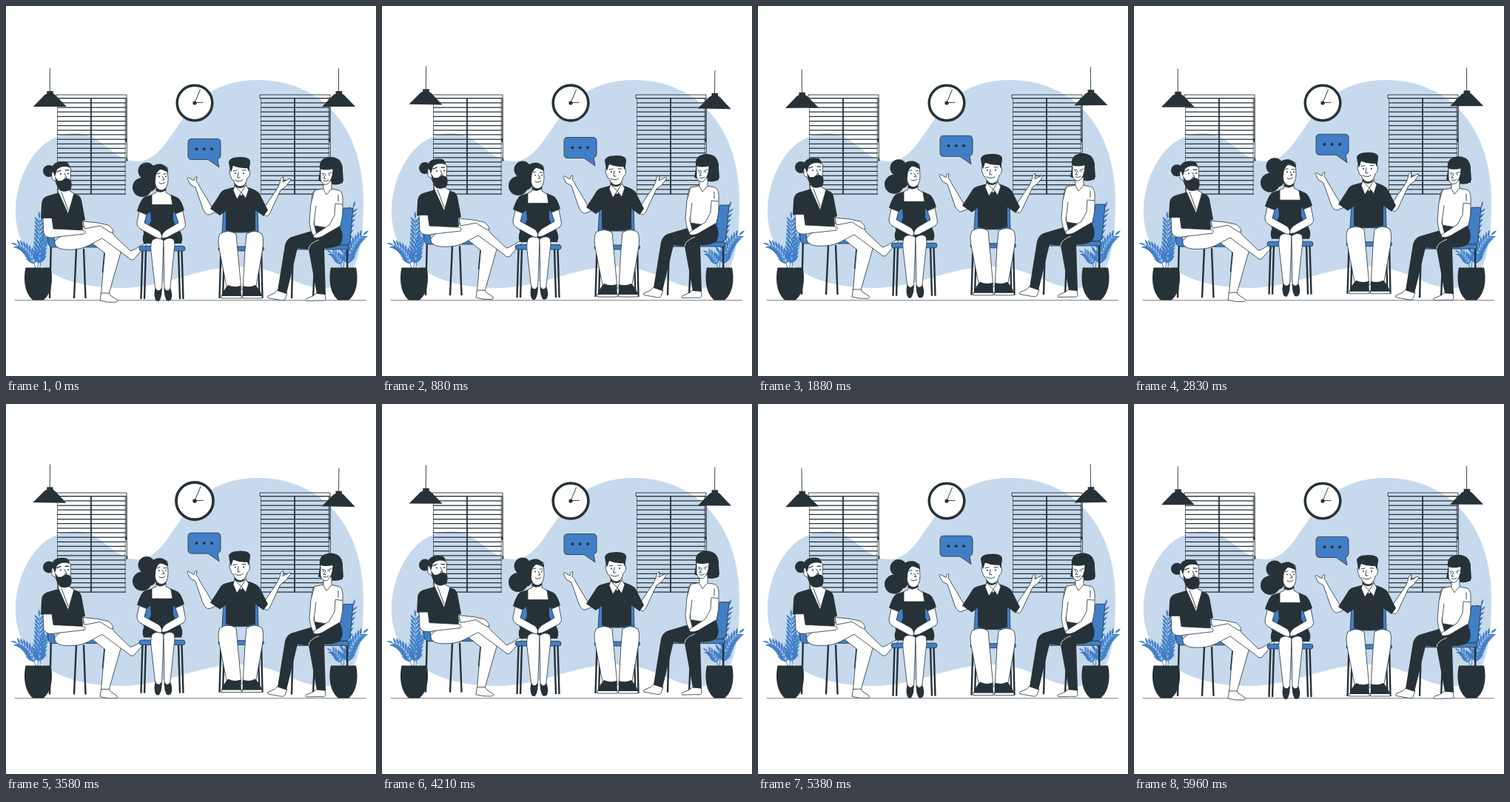
Recreate the animation shown at these times as an HTML page. Size 500 by 500 pixels, loop 6 s.

```html
<!DOCTYPE html>
<html lang="en">
<head>
<meta charset="utf-8">
<title>Group talk</title>
<style>
html, body { margin: 0; width: 100%; height: 100%; overflow: hidden; background: #fff; }
svg { display: block; width: 100%; height: 100%; }
.d { fill: #263238; }
.b { fill: #407fc8; }
.w { fill: #fff; stroke: #263238; stroke-width: .8; stroke-linejoin: round; }
.l { fill: none; stroke: #263238; stroke-width: .9; stroke-linecap: round; stroke-linejoin: round; }
.leg { fill: none; stroke: #263238; stroke-width: 2.4; }
.o { stroke: #263238; stroke-width: .8; stroke-linejoin: round; }
.thin { stroke-width: .6; }
.slat { stroke-width: 1.25; }
.thick { stroke-width: 1.8; }
</style>
</head>
<body>
<svg id="stage" viewBox="0 0 500 500" xmlns="http://www.w3.org/2000/svg"></svg>
<script>
const stage = document.getElementById('stage');
const path = (cls, d) => `<path class="${cls}" d="${d}"/>`;
const dot = (cls, x, y, r) => `<circle class="${cls}" cx="${x}" cy="${y}" r="${r}"/>`;
const group = (id, ...parts) => `<g id="${id}">${parts.join('')}</g>`;

function blinds(x) {
  let slats = '';
  for (let i = 0; i <= 21; i++) {
    slats += `M${x + 1} ${(124.7 + i * 6.16).toFixed(2)}h92`;
  }
  return path('l', `M${x} 120h94.500v4.700h-94.500Z`) +
    path('l slat', slats) +
    path('l thin', `M${x + 1} 125V254M${x + 92.6} 125V254`) +
    path('l thick', `M${x + 46.5} 125V254M${x + 93.6} 180v3M${x + 94.8} 206v3`) +
    path('l', `M${x + 93.6} 125V181M${x + 94.8} 125V207`);
}

// A frond: leaf pairs along a quadratic curve, shrinking toward the tip.
function frond(x0, y0, cx, cy, x1, y1, pairs, size) {
  let leaves = '';
  for (let i = 1; i <= pairs; i++) {
    const t = i / pairs, u = 1 - t;
    const x = u * u * x0 + 2 * u * t * cx + t * t * x1;
    const y = u * u * y0 + 2 * u * t * cy + t * t * y1;
    const dir = Math.atan2(u * (cy - y0) + t * (y1 - cy), u * (cx - x0) + t * (x1 - cx)) * 180 / Math.PI;
    const s = size * (1 - .35 * t);
    for (const turn of i === pairs ? [0] : [-36, 36]) {
      leaves += `<path class="b" transform="translate(${x.toFixed(1)} ${y.toFixed(1)}) rotate(${(dir + turn).toFixed(1)})"
        d="M0 0Q${s * .5} ${-s * .25} ${s} 0Q${s * .5} ${s * .25} 0 0Z"/>`;
    }
  }
  return `<path d="M${x0} ${y0}Q${cx} ${cy} ${x1} ${y1}" fill="none" stroke="#407fc8" stroke-width="1"/>` + leaves;
}

const pot = x => path('d', `M${x - 17} 353.500H${x + 17}C${x + 21} 372 ${x + 17} 390 ${x + 7} 397.500H${x - 7}C${x - 17} 390 ${x - 21} 372 ${x - 17} 353.500Z`);

const lamp = x =>
  path('l', `M${x} 84.500V116`) +
  path('d', `M${x - 4} 115H${x + 4.500}V118.500L${x + 7} 120L${x + 22.500} 136H${x - 22.500}L${x - 7} 120L${x - 4} 118.500Z`);

const backdrop =
  `<path fill="#c7d9ec" d="M13 272C15 235 37 172 95 172C130 172 145 210 177 210C232 210 228 100 340 100C427 100 483 166 483 262C483 340 470 381 430 381C390 381 370 352 315 352C260 352 215 381 155 381C70 381 10 345 13 272Z"/>` +
  blinds(68.5) + blinds(343.5) +
  path('l thin', 'M12 397.600H486');

const clock = group('clock',
  '<circle cx="255" cy="131" r="23.8" fill="#fff" stroke="#263238" stroke-width="3.5"/>',
  path('l', 'M255 131L262.500 113M255 130.700L266 130.300'),
  dot('d', 255, 131, 2.6));

const plants =
  frond(43, 354, 46, 318, 45, 288, 11, 16) +
  frond(40, 354, 33, 328, 16, 323, 9, 15) +
  frond(46, 354, 47, 325, 54, 312, 8, 14) +
  frond(456, 354, 459, 308, 469, 273, 10, 15) +
  frond(460, 354, 464, 325, 482, 310, 10, 16) +
  frond(454, 354, 450, 339, 441, 334, 6, 13) +
  pot(43.5) + pot(456);

const beardedMan = group('beardedMan',
  path('leg', 'M61 318L59 395M95 328L92 395M105 328L107.500 395M134 327L131 360'),
  path('b o', 'M56 310H64L66 318H133Q136 318 136 322V326H62Q58 326 57 320Z'),
  // supporting leg and foot
  path('w', 'M112 317C134 307 157 309 155 333L139 389H128.500L133.500 334Z'),
  path('w', 'M128.500 388H139L141 391L150 397Q152 400 147 400.300Q137 401 127 398Z'),
  // crossed leg
  path('w', 'M66 318C78 303 116 293 130 296C139 299 143 306 147 311L168 331C174 330 179 325 186 322Q190 320 189 324L172 343Q168 344 164 339L130 314C117 320 108 328 92 329C76 330 65 328 66 318Z'),
  path('w', 'M104 291L124 293L138 296Q145 301 145 306Q141 307 138 304L127 297L106 301Z'),
  // torso
  path('d', 'M72 252L55 257Q48 260 48 268L47 287L62 290L65 309Q86 308 104 302L103 291L107 289L102 262Q100 256 96 255L86 252Z'),
  path('w', 'M50 286.500H62L64 301L104 303Q109 304 106 308L70 312Q54 316 51 307Z'),
  path('w', 'M71 252L84 281L92 253L86 250V240H70Z'),
  path('l', 'M75 252L84 276'),
  // head
  dot('d', 58, 223, 8),
  path('w', 'M64 220Q61 224 62 231Q61 235 66 236L71 246Q80 252 87 240L87.500 219Q76 210 64 220Z'),
  path('d', 'M61 224C61 211 72 209 82 211Q86 214 86 218Q75 215 69 221L66 231L64 225Z'),
  path('d', 'M66 230L70 236Q76 237 78 234Q83 231 88 236Q90 245 86 249Q80 252 74 250Q68 246 66 230Z'),
  path('l slat', 'M69 224L74 222M80 222L85 222'),
  path('l', 'M79 226L82 232H79'),
  dot('d', 74, 227, 1), dot('d', 84, 226.5, 1));

const ponytailWoman = group('ponytailWoman',
  path('leg', 'M184.500 330L182.500 396M189 330L187 396M233 330L235 396M237.500 330L239.500 396'),
  path('b o', 'M190 274H231L235 306H186Z'),
  `<rect class="b o" x="180" y="324.500" width="62" height="6.500" rx="3"/>`,
  path('d', 'M190 301H233Q241 311 237 321H186Q182 311 190 301Z'),
  path('w', 'M198 316Q206 311 213 317L210.500 385H202L196 332Q195 321 198 316Z'),
  path('w', 'M213 317Q221 311 227 316Q229 323 227 332L221.500 385H214Z'),
  path('d', 'M202 381Q206 388 210 381Q212 391 207 398.500Q204 400 202 397Q199 389 202 381Z'),
  path('d', 'M214 381Q218 388 222 381Q226 390 223 397Q220 400 217 398Q213 391 214 381Z'),
  path('d', 'M197 255L187 258Q182 261 177 277L190 282L195 278L196 290L190 304Q210 308 233 304L226 290L226 278L229 281L241 276Q237 262 232 259L223 255Z'),
  path('w', 'M180 278L190 282L187 293L207 304Q213 311 209 315L203 313L181 301Q176 297 177 292Z'),
  path('w', 'M239 277L229 281L233 293L216 303Q209 309 211 314L217 313L240 301Q244 297 242 292Z'),
  path('w', 'M197 268.500V255L203 252V240H216V252L223 256L225 268.500Z'),
  path('d', 'M203 245Q209 252 216 246V249Q209 254 203 250Z'),
  dot('d', 190, 223, 11.5), dot('d', 184, 245, 13), dot('d', 193, 240, 11),
  path('w', 'M201 221V238Q203 249 211 249Q219 247 219 234L218 218Q210 213 201 221Z'),
  path('d', 'M194 234C191 217 202 212 211 214Q219 217 219 225Q212 221 208 221Q202 225 202 235L201 243Q195 243 194 234Z'),
  path('l', 'M204 227L208 226M213 227L217 227M211 230L214 235H211M207 239Q211 242 215 238'),
  dot('d', 207, 230.5, .9), dot('d', 216, 230.5, .9));

const speaker = group('speaker',
  path('leg', 'M290.500 330L288.500 395M295 330L293 395M340.500 330L342.500 395M345 330L346.500 395'),
  path('b o', 'M294 273H340L341 306H292Z'),
  `<rect class="b o" x="287" y="325" width="61.500" height="6" rx="3"/>`,
  path('w', 'M289 308Q300 301 311 308L313 330L318 384H299L289 333Q285 316 289 308Z'),
  path('w', 'M325 308Q336 301 346 308Q349 316 346 333L337 384H320L323 330Z'),
  path('w', 'M291 391H318V395H291ZM319.500 391H346V395H319.500Z'),
  path('d', 'M300 377Q308 381 317 378L318 392H291.500Q293 385 300 377Z'),
  path('d', 'M320 378Q329 381 337 377Q344 385 346 392H319.500Z'),
  // arms with open hands
  path('w', 'M279 273L261 243Q260 239 257 237L258 231Q255 230 254 236L246 231.500Q244 232 246 235L249 241L256 245L266 274Q270 283 275 282L287 277Z'),
  path('w', 'M343 274L350 283Q354 286 357 279L371 249L378 244L384 236Q386 232 382 234L374 238L375 231Q371 231 370 239L367 246L350 271Z'),
  path('d', 'M307 245L296 248Q291 249 287 257L276 274L289 283L297 277V303Q316 309 337 303V276L348 284L354 276L343 254Q340 249 327 245Z'),
  path('w', 'M309 234V247L318 257L325 246L323 234Z'),
  path('w', 'M309 243L307 249L312 261L318 252L324 260L328 248L324 242L318 252Z'),
  path('d', 'M309 239Q315 248 323 241L322 244Q315 249 309 243Z'),
  path('w', 'M304 219Q300 223 304 231Q304 235 307 235Q310 244 317 244Q324 243 326 233Q331 229 329 222L327 215H305Z'),
  path('d', 'M304 225Q302 219 301 211Q302 204 317 204Q331 204 330 212L328 224L326 219Q316 220 307 216Z'),
  path('l', 'M307 223L312 222M319 222L324 222M314 225L313 232H316M309 235Q315 239 320 235'),
  dot('d', 310, 226, 1), dot('d', 321, 226, 1));

const bobWoman = group('bobWoman',
  path('leg', 'M388 327L386 395M418 328L415 395M461 325L461.500 395'),
  path('b o', 'M456 273H469L465 317Q464 322 458 323H448Z'),
  path('b o', 'M384 323H463V329H386Q383 328 384 323Z'),
  // bare feet
  path('w', 'M368 383L380 388L377 396Q376 399 368 397L354 394.500Q352 392 356 391Q364 389 368 383Z'),
  path('w', 'M421 387L431 388L432 396Q431 399 424 398L406 398.500Q403 397 407 395Q415 393 421 387Z'),
  path('d', 'M418 297L451 298Q458 312 452 322Q445 328 430 327L432 390L420 389L409 329L394 327L379 389L367 385L377 323Q379 315 386 312L413 304Z'),
  `<path d="M409 329Q409 321 423 316" fill="none" stroke="#fff" stroke-width=".8"/>`,
  path('d', 'M422 236L425 218Q430 204 441 206Q455 207 455 223L456 236Q452 243 441 241Z'),
  path('w', 'M428 247L417 249Q413 253 413 266L416 284L417 297Q434 301 449 299L447 284L455 267Q456 251 450 249L439 247Z'),
  path('w', 'M417 249L412 267L410 292Q411 304 416 312L420 309L416 294L419 270'),
  path('w', 'M445 267L455 268Q456 282 452 297L433 308Q423 315 416 313Q414 309 420 307L437 296L444 283Z'),
  path('w', 'M429 238V248L433 255L440 247V236Z'),
  path('w', 'M425 217V234Q427 243 434 241Q441 236 442 222L439 214Z'),
  path('d', 'M424 220Q422 205 438 204Q455 204 455 222L455 239Q448 242 440 239L442 220Q432 223 424 220Z'),
  path('l', 'M427 226L431 227M435 227L440 225M432 228L429 233H432M429 236Q433 238 436 235M449 255V264'),
  dot('d', 428.5, 228.5, .8), dot('d', 437, 228.5, .8));

const bubble = group('bubble',
  path('b o', 'M251 179.500H285Q290 179.500 290 184.500V202Q290 206 286 207L288 218L273 207.500H251Q246 207.500 246 202.500V184.500Q246 179.500 251 179.500Z'),
  dot('d', 257.5, 193.3, 2), dot('d', 267.8, 193.3, 2), dot('d', 278, 193.3, 2));

stage.innerHTML = backdrop + clock + plants + beardedMan + ponytailWoman + speaker + bobWoman + bubble +
  group('lamps', lamp(59.3), lamp(449.6));

// Linear interpolation through [phase, value] stops.
function track(stops, phase) {
  const i = stops.findIndex(s => s[0] > phase);
  const [p0, v0] = stops[i - 1], [p1, v1] = stops[i];
  return v0 + (v1 - v0) * (phase - p0) / (p1 - p0);
}

const LIFT = [[0, 0], [.5, -6.67], [1, 0]];
const SWAY = [[0, 0], [.25, 1], [.75, -1], [1, 0]];
const BEAT = [[0, 1], [.1, 1.1], [.3, 1], [.4, 1], [.5, 1.1], [.6, 1], [1, 1]];
const move = (id, value) => document.getElementById(id).setAttribute('transform', value);

function render(now) {
  const slow = now % 6000 / 6000, fast = now % 3000 / 3000;
  for (const id of ['ponytailWoman', 'speaker', 'bubble']) move(id, `translate(0 ${track(LIFT, slow)})`);
  for (const id of ['beardedMan', 'bobWoman']) move(id, `translate(0 ${track(LIFT, fast)})`);
  move('lamps', `rotate(${track(SWAY, fast)} 254.5 110)`);
  move('clock', `translate(255 131) scale(${track(BEAT, fast)}) translate(-255 -131)`);
}

const start = performance.now();
function tick() {
  render(performance.now() - start);
  requestAnimationFrame(tick);
}
render(0);
requestAnimationFrame(tick);
</script>
</body>
</html>
```
